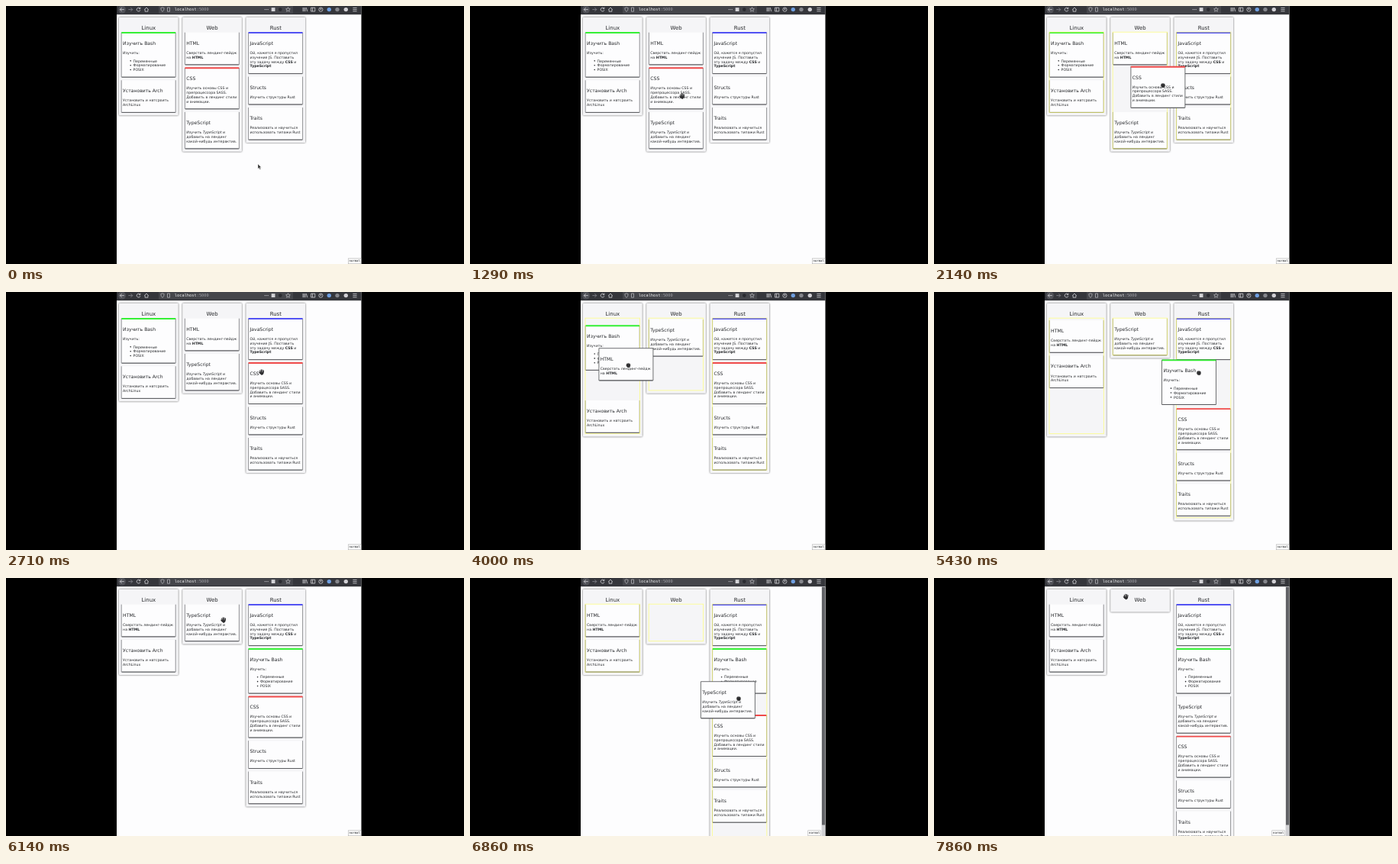
Recreate the animation shown at these times as an HTML page. Size 600 px wide and 338 px high, loop 8 s.

```html
<!DOCTYPE html>
<html lang="ru">
<head>
<meta charset="utf-8">
<title>Kanban board</title>
<style>
  html, body { margin: 0; width: 100%; height: 100%; overflow: hidden; background: #000; }
  svg { display: block; width: 600px; height: 338px; }
  text { font-family: "DejaVu Sans", sans-serif; font-size: 4.7px; fill: #26282b; text-rendering: geometricPrecision; white-space: pre; }
  .head { font-size: 6.95px; text-anchor: middle; }
  .title { font-size: 6.1px; }
  .mono { font-family: "DejaVu Sans Mono", monospace; }
  .column { fill: #f5f5f7; filter: drop-shadow(0 .7px .8px rgba(0, 0, 0, .65)); }
  .zone { fill: none; stroke: #ffff66; stroke-opacity: .7; stroke-width: .9; }
  .icon { fill: none; stroke: #d4d4d8; stroke-width: .8; }
</style>
</head>
<body>
<svg viewBox="0 0 600 338">
  <rect width="600" height="338" fill="#000"/>
  <rect x="145" width="320.5" height="338" fill="#fdfdfe"/>
  <g id="columns"></g>
  <g id="cards"></g>
  <g id="zones"></g>
  <g id="lifted"></g>
  <g id="scrollbar">
    <rect x="460.6" y="11" width="4.9" height="327" fill="#cfcfd2"/>
    <rect x="461" y="12" width="4.1" height="311.5" fill="#626367"/>
  </g>
  <g id="mode">
    <rect x="448.3" y="330.8" width="16.8" height="7" fill="#fafafa" stroke="#a5a5a5" stroke-width=".5"/>
    <text class="mono" x="449.6" y="335.4" style="font-size:3.95px">normal</text>
  </g>
  <g id="toolbar">
    <rect x="145" width="320.5" height="11.2" fill="#35363b"/>
    <rect x="200" y="-2" width="176" height="11.8" rx="1" fill="#45464b"/>
    <circle cx="152" cy="4.6" r="5" fill="#505157"/>
    <g class="icon">
      <path d="M154.8 4.6H149.4M151.7 2.2L149.3 4.6L151.7 7"/>
      <path d="M160.3 4.6H165.7M163.4 2.2L165.8 4.6L163.4 7" stroke="#8a8a90"/>
      <path d="M175.4 3A2.4 2.4 0 1 0 175.9 5.3M175.9 1.6V3.7H173.7"/>
      <path d="M181.2 4.8L184 2L186.8 4.8M182.1 4.4V7.2H185.9V4.4"/>
      <path d="M205 1.8L207.2 2.6Q207.2 6 205 7.4Q202.8 6 202.8 2.6Z" stroke="#b0b0b5"/>
      <path d="M211.5 2H214.5V7.2H211.5Z" stroke="#b0b0b5"/>
      <path d="M369.5 1.7L370.4 3.6L372.4 3.8L370.9 5.2L371.3 7.2L369.5 6.2L367.7 7.2L368.1 5.2L366.6 3.8L368.6 3.6Z" stroke-width=".6"/>
      <path d="M389 2V7.2M390.6 2V7.2M392.2 2V7.2M393.4 2.2L394.8 7.2"/>
      <path d="M399.6 2.2H404.8V7H399.6ZM401.6 2.2V7"/>
      <circle cx="412.4" cy="4.6" r="2.6"/><circle cx="412.4" cy="4" r=".7"/>
      <path d="M454.4 2.4H459.6M454.4 4.6H459.6M454.4 6.8H459.6"/>
    </g>
    <g fill="#d4d4d8">
      <circle cx="339.2" cy="4.6" r=".6"/><circle cx="341.2" cy="4.6" r=".6"/><circle cx="343.2" cy="4.6" r=".6"/>
      <rect x="347.7" y="2.2" width="4.8" height="4.8"/>
    </g>
    <circle cx="359.3" cy="4.6" r="2.3" fill="#2a2b30"/>
    <circle cx="423.3" cy="4.6" r="2.7" fill="#6f9fe0"/>
    <circle cx="434" cy="4.6" r="2.7" fill="#85868c"/>
    <circle cx="445.3" cy="4.6" r="2.7" fill="#d0cfd4"/>
    <text class="mono" x="220.8" y="6.4" style="font-size:5.33px;fill:#f4f4f6">localhost<tspan fill="#a2a2a8">:5000</tspan></text>
  </g>
  <g id="cursor">
    <path id="arrow" d="M0 0V6.3L1.5 5L2.6 7.3L3.7 6.8L2.6 4.6L4.5 4.4Z" fill="#333" stroke="#fff" stroke-width=".35"/>
    <g id="open" fill="none" stroke="#2c2c2e" stroke-linecap="round" stroke-linejoin="round">
      <path d="M-1.8 .6L-2.3 -2M-.5 0L-.7 -3.1M.9 0L1 -3M2.1 .6L2.5 -1.9M-1.7 1.8L-3.2 .1" stroke-width="1.15"/>
      <path d="M-1.7 .4H2.1L1.9 2.2L1 3.2H-.6L-1.7 1.8Z" fill="#2c2c2e" stroke-width=".9"/>
    </g>
    <g id="fist">
      <path d="M-2.4 -1.4Q-1.9 -2.7 -.9 -2.2Q0 -3 .8 -2.2Q1.9 -2.5 2.4 -1.2L2.5 .9L1.5 2.7H-1.2L-2.7 .8Z" fill="#2c2c2e" stroke="#444" stroke-width=".4"/>
      <path d="M-.8 -1.8V-.6M.7 -1.8V-.6" stroke="#77777a" stroke-width=".3"/>
    </g>
  </g>
</svg>
<script>
const LOOP = 8000, FPS = 7, FLIP = 300;
const TOP = 34.7, GAP = 4.05, LINE = 5.85, CARD_W = 71, COL_W = 77.7;
const colX = i => 148 + 83.2 * i;
const cardX = i => colX(i) + 3.2;
const $ = id => document.getElementById(id);

function el(parent, tag, attrs, content) {
  const node = document.createElementNS('http://www.w3.org/2000/svg', tag);
  for (const key in attrs) node.setAttribute(key, attrs[key]);
  if (content) node.innerHTML = content;
  return parent.appendChild(node);
}

const GREEN = '#35f035', RED = '#ef4a4a', BLUE = '#5252f3';
// In body lines *x* is bold, _x_ italic, and a leading "-" makes a list item.
const cards = {
  bash: { title: 'Изучить Bash', top: GREEN, body: ['Изучить:', '-Переменные', '-Форматирование', '-POSIX'] },
  arch: { title: 'Установить Arch', body: ['Установить и натсроить', 'ArchLinux'] },
  html: { title: 'HTML', body: ['Сверстать лендинг-пейдж', 'на *HTML*'] },
  css: { title: 'CSS', top: RED, body: ['Изучить основы CSS и', 'препроцессора SASS.', 'Добавить в лендинг стили', 'и анимации.'] },
  ts: { title: 'TypeScript', body: ['Изучить _TypeScript_ и', 'добавить на лендинг', 'какой-нибудь интерактив.'] },
  js: { title: 'JavaScript', top: BLUE, body: ['Ой, кажется я пропустил', 'изучение JS. Поставить', 'эту задачу между *CSS* и', '*TypeScript*'] },
  structs: { title: 'Structs', body: ['Изучить структуры Rust'] },
  traits: { title: 'Traits', body: ['Реализовать и научиться', 'использовать типажи Rust'] }
};
const start = [['bash', 'arch'], ['html', 'css', 'ts'], ['js', 'structs', 'traits']];

// Places a card takes in the lists, in ms.
const moves = [
  { at: 2380, card: 'css', col: 2, index: 1 },
  { at: 3793, card: 'html', col: 0, index: 0 },
  { at: 3875, card: 'html', col: 0, index: 1 },
  { at: 5230, card: 'bash', col: 2, index: 1 },
  { at: 6800, card: 'ts', col: 2, index: 2 }
];
// Lift, release and landing are counted in ticks.
const drags = [
  { card: 'css', col: 1, lift: 15, release: 18, land: 19, grab: [276.5, 105.5], home: 80.95 },
  { card: 'html', col: 1, lift: 26, release: 29, land: 30, grab: [273, 57], home: TOP },
  { card: 'bash', col: 0, lift: 36, release: 39, land: 40, grab: [199.7, 51.7], home: TOP },
  { card: 'ts', col: 1, lift: 46, release: 49, land: 50, grab: [284, 57], home: TOP }
];
// Pointer keys: tick, x, y.
const pointer = [
  [6, 330, 207], [7, 321, 190], [8, 300, 152], [9, 278, 118], [10, 269, 105], [11, 276.5, 105.5],
  [14, 276.5, 105.5], [15, 300, 104], [16, 321, 101], [17, 334, 105], [19, 335, 105], [20, 338, 105],
  [21, 338, 105], [22, 316, 88], [23, 288, 66], [24, 273, 57], [25, 273, 57], [26, 256, 66],
  [27, 225, 84], [28, 207.5, 96], [30, 207, 95], [31, 207, 95], [32, 190, 70], [33, 199.7, 51.7],
  [35, 199.7, 51.7], [36, 326, 71], [37, 341, 93], [38, 347, 106], [41, 346, 106], [42, 346, 106],
  [43, 285, 55], [44, 284, 57], [45, 284, 57], [46, 304, 76], [48, 352, 158], [50, 352, 158],
  [53, 290, 69], [54, 268, 42], [55, 251.5, 24.5]
];

const lerp = (a, b, p) => a + (b - a) * p;
const cubicOut = p => 1 - (1 - Math.min(1, p)) ** 3;
const rich = s => s
  .replace(/\*(.+?)\*/g, '<tspan font-weight="bold">$1</tspan>')
  .replace(/_(.+?)_/g, '<tspan font-style="italic">$1</tspan>');

function buildCard(card) {
  const list = card.body.some(line => line[0] === '-');
  const h = card.height = 30.5 + LINE * card.body.length + (list ? 4.6 : 0);
  const g = card.node = el($('cards'), 'g');
  el(g, 'rect', { width: CARD_W, height: h, rx: .8, fill: '#fdfdfe' });
  card.frame = el(g, 'path', { fill: 'none', 'stroke-width': .8, 'stroke-linejoin': 'round' });
  el(g, 'path', { d: `M.6 ${h}H${CARD_W - .6}`, stroke: '#55565a', 'stroke-width': .9 });
  if (card.top) el(g, 'rect', { y: -.6, width: CARD_W, height: 1.9, rx: .5, fill: card.top });
  el(g, 'text', { class: 'title', x: 1.9, y: 16.1 }, card.title);
  card.body.forEach((line, i) => {
    const item = line[0] === '-';
    const y = 28.2 + LINE * i + (item ? 4.8 : 0);
    if (item) el(g, 'circle', { cx: 12, cy: y - 1.7, r: .8, fill: '#26282b' });
    el(g, 'text', { x: item ? 15.4 : 1.9, y }, rich(item ? line.slice(1) : line));
  });
}
Object.values(cards).forEach(buildCard);

const columns = ['Linux', 'Web', 'Rust'].map((name, i) => {
  const box = el($('columns'), 'rect', { class: 'column', x: colX(i), y: 14.7, width: COL_W, rx: 1.2 });
  el($('columns'), 'text', { class: 'head', x: colX(i) + COL_W / 2, y: 31.3 }, name);
  const zone = el($('zones'), 'rect', { class: 'zone', x: cardX(i) - .2, y: TOP - .5, width: CARD_W + .4 });
  return { box, zone };
});

function layout(order) {
  const y = {};
  const bottoms = order.map(list => {
    let next = TOP;
    for (const id of list) {
      y[id] = next;
      next += cards[id].height + GAP;
    }
    return list.length ? next - .2 : 44.4;
  });
  return { y, bottoms };
}

// Every card slides on its own from its last slot to its new one.
function board(t, drag) {
  const order = start.map(list => [...list]);
  let now = layout(order);
  const slide = {};
  let locked = 0;
  const liftTime = drag ? drag.lift * 1000 / FPS : Infinity;
  if (drag) locked = now.bottoms[drag.col];
  for (const move of moves) {
    if (move.at > t) break;
    for (const list of order) {
      const i = list.indexOf(move.card);
      if (i >= 0) list.splice(i, 1);
    }
    order[move.col].splice(move.index, 0, move.card);
    const next = layout(order);
    for (const id in next.y)
      if (next.y[id] !== now.y[id]) slide[id] = { from: now.y[id], at: move.at };
    now = next;
    if (drag && move.at < liftTime) locked = now.bottoms[drag.col];
  }
  const y = {};
  for (const id in now.y) {
    const s = slide[id];
    y[id] = s ? lerp(s.from, now.y[id], cubicOut((t - s.at) / FLIP)) : now.y[id];
  }
  if (drag) now.bottoms[drag.col] = Math.max(now.bottoms[drag.col], locked);
  return { order, y, slots: now.y, bottoms: now.bottoms };
}

function pointerAt(tick) {
  const i = pointer.findIndex(key => key[0] >= tick);
  const b = pointer[i], a = pointer[Math.max(0, i - 1)];
  const p = a === b ? 0 : (tick - a[0]) / (b[0] - a[0]);
  return [lerp(a[1], b[1], p), lerp(a[2], b[2], p)];
}

const show = (node, on) => node.setAttribute('display', on ? 'inline' : 'none');
const moveTo = (node, x, y) => node.setAttribute('transform', `translate(${x.toFixed(2)} ${y.toFixed(2)})`);

function render(ms) {
  const tick = Math.floor(ms * FPS / 1000 + .05);
  const t = tick * 1000 / FPS;
  const drag = drags.find(d => tick >= d.lift && tick < d.land);
  const state = board(t, drag);
  const [px, py] = pointerAt(tick);

  state.order.forEach((list, col) => {
    const bottom = state.bottoms[col];
    columns[col].box.setAttribute('height', bottom - 14.7);
    columns[col].zone.setAttribute('height', bottom - 3.4 - TOP);
    for (const id of list) {
      const card = cards[id], h = card.height;
      const lifted = Boolean(drag && drag.card === id);
      const layer = $(lifted ? 'lifted' : 'cards');
      if (card.node.parentNode !== layer) layer.appendChild(card.node);
      card.frame.setAttribute('d', `M0 0V${h}H${CARD_W}V0${lifted ? 'Z' : ''}`);
      card.frame.setAttribute('stroke', lifted ? '#4c4d50' : '#77787c');
      let x = cardX(col), y = state.y[id];
      if (lifted) {
        const landing = tick >= drag.release ? .6 : 0;
        x = lerp(cardX(drag.col) + px - drag.grab[0], x, landing);
        y = lerp(drag.home + py - drag.grab[1], state.slots[id], landing);
      }
      moveTo(card.node, x, y);
    }
  });

  show($('zones'), drag);
  const overflow = Math.max(...state.bottoms) > 338;
  show($('scrollbar'), overflow);
  moveTo($('mode'), overflow ? -5.5 : 0, 0);

  moveTo($('cursor'), px, py);
  show($('arrow'), tick < 8);
  show($('open'), tick >= 8 && !drag);
  show($('fist'), drag);
}

const origin = performance.now();
function loop() {
  render((performance.now() - origin) % LOOP);
  requestAnimationFrame(loop);
}
loop();
</script>
</body>
</html>
```
